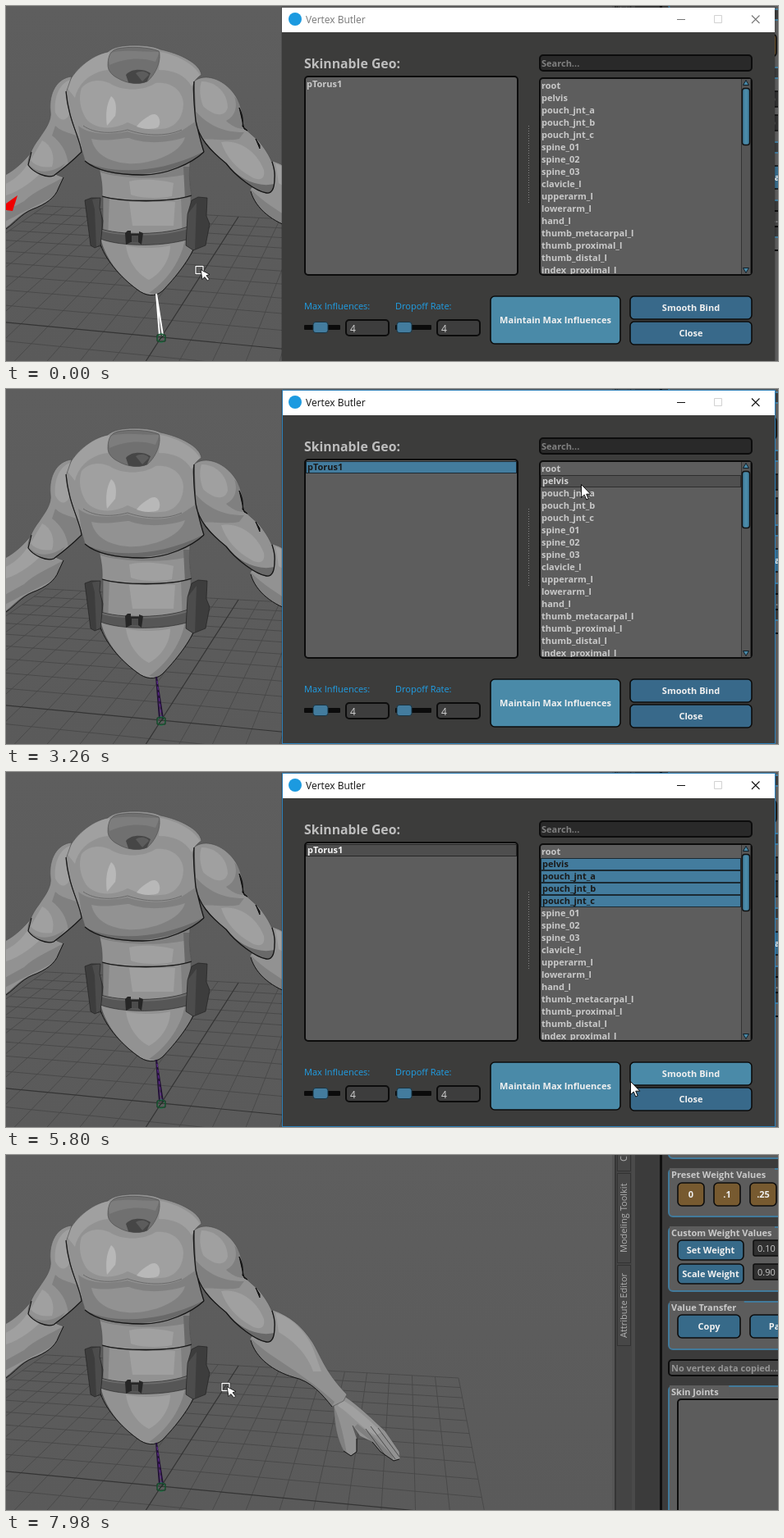
An HTML page for the animation above (8 s loop, 940 by 433 pixels).

```html
<!DOCTYPE html>
<html lang="en">
<head>
<meta charset="utf-8">
<title>Skin binding</title>
<style>
html, body { margin: 0; width: 100%; height: 100%; overflow: hidden; background: #5c5c5c; }
svg { display: block; width: 940px; height: 433px; font-family: "Open Sans", "Noto Sans", sans-serif; }
text { white-space: pre; }
</style>
</head>
<body>
<svg id="stage" viewBox="0 0 940 433">
  <defs>
    <linearGradient id="bg" x2="0" y2="1"><stop stop-color="#5e5e5e"/><stop offset="1" stop-color="#5a5a5a"/></linearGradient>
    <linearGradient id="thumb" x2="1"><stop stop-color="#3d7897"/><stop offset=".5" stop-color="#4d8eac"/><stop offset="1" stop-color="#3d7897"/></linearGradient>
    <clipPath id="listClip"><rect x="651" y="89" width="245" height="238"/></clipPath>
  </defs>
  <rect width="940" height="433" fill="url(#bg)"/>
</svg>
<script>
const LOOP = 8000, FRAME = 120;
const BLUE = '#4a8aa8', DEEP = '#38698a', EDGE = '#0c0c0c', TEXT = '#c9c9c9';
const stage = document.getElementById('stage');

function add(parent, tag, attrs) {
  const el = document.createElementNS('http://www.w3.org/2000/svg', tag);
  for (const k in attrs) el.setAttribute(k, attrs[k]);
  parent.appendChild(el);
  return el;
}
const group = (parent, attrs) => add(parent, 'g', attrs);
const path = (parent, d, fill, stroke = 'none', w = 1) =>
  add(parent, 'path', { d, fill, stroke, 'stroke-width': w, 'stroke-linejoin': 'round' });
const rect = (parent, x, y, width, height, fill, rx = 0, stroke = 'none', w = 2) =>
  add(parent, 'rect', { x, y, width, height, fill, rx, stroke, 'stroke-width': w });
function label(parent, x, y, str, fill = TEXT, size = 11, weight = 700, extra = {}) {
  const el = add(parent, 'text', { x, y, fill, 'font-size': size, 'font-weight': weight, ...extra });
  el.textContent = str;
  return el;
}
function button(parent, x, y, w, h, str, fill = DEEP) {
  const box = rect(parent, x + 1, y + 1, w - 2, h - 2, fill, 5, EDGE, 1.6);
  label(parent, x + w / 2, y + h / 2 + 4, str, '#f0f0f0', 11, 700, { 'text-anchor': 'middle' });
  return box;
}

/* ---------- ground grid ---------- */
function ground(u, v) {
  const w = 1 - .0945 * u + .4622 * v;
  return ((339.8 * u + 224.8 * v + 189) / w).toFixed(1) + ' ' + ((-3.8 * u - 28.2 * v + 404) / w).toFixed(1);
}
const view = group(stage, {});
let thin = '';
for (let i = -10; i <= 10; i++) {
  const k = i / 10;
  if (i) thin += `M${ground(k, -.6)}L${ground(k, 1)}M${ground(-1, k)}L${ground(1, k)}`;
}
path(view, thin, 'none', '#484848', .9);
path(view, `M${ground(0, -.6)}L${ground(0, 1)}M${ground(-1, 0)}L${ground(1, 0)}`, 'none', '#343434', 1.2);

/* ---------- figure ---------- */
let clips = 0;
function part(d, fill, bands = [], line = '#4a4a4a') {
  const id = 'part' + clips++;
  path(add(stage.querySelector('defs'), 'clipPath', { id }), d, '#fff');
  path(view, d, fill);
  const g = group(view, { 'clip-path': `url(#${id})` });
  for (const [b, c] of bands) path(g, b, c);
  path(view, d, 'none', line, .6);
}
const crease = (d, w = 1.3) => path(view, d, 'none', '#161616', w);
const L = '#a0a0a0', H = '#b8b8b8', M = '#929292', D = '#808080', K = '#696969';

// far forearm and hand
part('M399 306L412 294C430 306 448 324 462 337L479 362L480 371L472 373L456 362L446 350L431 343L422 330L427 345L427 362L420 367L411 361C403 346 400 330 399 306Z', M, [
  ['M408 298C428 308 446 328 458 338L450 342C434 334 420 316 404 306Z', L],
  ['M400 308C408 326 412 348 415 364L410 362C404 344 400 330 399 306Z', D],
  ['M424 332L446 350L456 362L472 373L470 366L448 344L428 328Z', D]]);
path(view, 'M444 331L474 371M453 333L479 368M438 334L462 367', 'none', '#444', .9);
crease('M427 346L427 362L420 367L411 361M446 350L456 362L472 373L479 371', 1);
part('M325 189C345 196 360 208 373 228C384 246 388 264 415 292L411 300L397 307C385 292 372 276 350 271C326 264 304 248 297 224Z', M, [
  ['M328 192C352 200 370 222 376 242L384 264L374 264C366 240 346 224 332 216Z', L],
  ['M297 222C318 246 352 258 400 301L396 308C376 278 336 276 300 250Z', D]]);
crease('M298 226C304 248 326 264 350 271C372 276 385 292 397 307', 1);

// near forearm
part('M31 178C20 192 8 202 -3 207L-3 273C10 264 16 254 32 248C48 242 60 234 64 222L70 209L62 206Z', M, [
  ['M32 182C24 200 12 212 -3 218L-3 232C18 226 34 212 44 202Z', L],
  ['M70 209C54 218 34 226 22 238L-3 252V264C18 252 46 240 62 230Z', D]]);
crease('M0 272C12 264 18 254 32 248C48 242 60 234 64 222L70 209', 1);

// waist
part('M111 190L224 190C223 206 223 216 226 231C200 240 140 239 117 232C118 218 115 204 111 190Z', M, [
  ['M111 190H224V204C200 212 140 212 112 202Z', D],
  ['M150 214C164 210 190 212 204 216L202 232C184 236 162 234 152 230Z', L],
  ['M216 196L228 196V236H218Z', K]]);
part('M118 233C146 240 198 240 225 232L226 282L118 284Z', M, [
  ['M150 239H206L204 268H154Z', L], ['M213 232H228V286H215Z', D], ['M117 232H126L124 284H117Z', D]]);
crease('M117 232C140 239 200 240 226 231');
part('M114 278C118 306 138 330 160 346C170 354 182 355 190 348C206 332 226 306 230 290L222 280C196 294 140 292 114 278Z', M, [
  ['M146 292C160 296 188 296 200 292C200 312 186 328 174 334C158 326 148 308 146 292Z', L],
  ['M218 284L232 284C228 310 206 340 186 353L174 350C198 334 214 308 218 284Z', D]]);
crease('M114 288C120 308 138 330 160 346C170 354 182 355 190 348C206 332 226 306 230 292', 1);

// belt and pouches
part('M113 271C136 280 196 280 224 268L226 283C196 294 140 294 115 284Z', '#565656', [
  ['M113 271C136 280 196 280 224 268V271C196 282 140 282 114 274Z', '#6c6c6c']], '#222');
path(view, 'M145 277L148 274H152V278H162V275L167 277L165 291L161 288H152L146 291Z', '#262626');
rect(view, 153, 280, 8, 8, '#4c4c4c');
part('M96 237L104 234H115L114 246L118 262L115 292L108 295L103 292Z', '#3d3d3d', [
  ['M105 236L115 234L117 290L110 294L108 248Z', '#4c4c4c']], '#1e1e1e');
part('M226 237L234 233L245 234L244 256L248 266L243 292L228 298L219 292L221 254Z', '#3d3d3d', [
  ['M221 254L232 240L230 298L219 294Z', '#4c4c4c']], '#1e1e1e');

// ribcage
part('M124 56C130 50 142 48 156 48C172 48 182 50 188 53C212 58 236 70 238 84C230 89 227 94 228 104C230 132 236 160 241 178C226 192 196 206 166 206C134 206 110 201 96 189C92 170 76 140 73 100C82 78 104 60 124 56Z', M, [
  ['M73 98C84 74 106 58 126 56L124 78C104 80 88 94 84 112Z', L],
  ['M188 56C210 60 230 72 236 84L226 98C218 84 204 78 186 78Z', L],
  ['M88 146C100 156 122 158 148 153C166 159 194 162 214 152L232 140L242 180C214 200 176 208 148 206C116 204 98 196 94 186Z', D],
  ['M104 162C122 166 142 161 150 161C166 168 196 168 218 160C212 182 172 194 148 192C124 190 108 180 104 162Z', M],
  ['M92 100C102 88 118 90 126 94C140 104 168 104 182 94C198 92 214 100 216 118C216 138 204 150 188 150C170 152 158 146 148 142C130 152 108 150 98 138C90 126 88 112 92 100Z', L],
  ['M128 110C134 114 135 124 133 134L123 146C121 134 122 120 128 110Z', H],
  ['M176 133C186 128 190 142 185 148C174 152 164 149 159 147C162 142 168 138 176 133Z', H],
  ['M94 188C120 204 180 208 240 178V182C200 208 130 214 96 192Z', K]]);
path(view, 'M94 146C108 156 130 156 148 151C168 158 194 160 214 151', 'none', '#6a6a6a', 1);
part('M124 72C124 60 128 54 136 52C150 49 174 50 186 55C190 66 182 84 172 92C160 97 146 94 136 88C128 84 124 78 124 72Z', '#707070', [
  ['M124 58C140 52 164 56 187 56L182 68C164 62 144 64 126 72Z', '#7d7d7d'],
  ['M146 84C152 76 168 76 176 82L170 96H150Z', '#464646'],
  ['M158 82C164 78 172 80 174 84L166 92Z', '#5c5c5c']]);
crease('M96 189C110 201 134 206 166 206C196 206 226 192 241 178');

// upper arms
part('M80 86C62 88 52 106 54 128C56 140 48 150 40 162C32 172 26 186 27 194C34 204 50 210 58 207C70 198 80 190 92 178C90 160 76 140 73 106Z', M, [
  ['M78 90C66 94 58 110 60 130C66 142 74 140 77 132L73 106Z', L],
  ['M60 146C70 156 82 154 92 162V182L76 194C74 176 66 166 56 158Z', D],
  ['M44 164C56 170 60 184 56 196C44 198 34 194 30 188Z', L],
  ['M27 192C38 206 56 204 72 192L60 210H30Z', D]]);
crease('M73 104C76 140 90 160 92 178C80 190 70 198 58 207C50 210 34 204 27 194L31 178', 1.1);
part('M229 92C242 81 264 89 277 106C287 119 289 134 288 147L308 165C320 180 328 194 327 210C327 222 324 229 317 228C304 226 280 208 268 192C248 176 234 160 231 140Z', M, [
  ['M238 92C256 92 270 106 270 124C266 138 250 132 240 122C236 112 235 100 238 92Z', L],
  ['M278 110L290 124V150C282 150 274 146 268 140C280 134 282 122 278 110Z', D],
  ['M229 126C244 144 262 154 290 154L284 162C266 166 246 160 236 164Z', D],
  ['M262 166C284 162 306 178 314 200C316 212 308 214 298 208C280 198 268 184 262 166Z', L],
  ['M264 190C284 210 304 222 327 217L322 232C300 230 276 208 262 192Z', K]]);
crease('M229 92C228 104 229 122 231 140C234 152 237 166 241 178M231 140C234 160 248 176 268 192C280 208 304 226 317 228C324 229 327 222 327 210C328 202 326 196 324 190');
path(view, 'M284 124C288 132 289 140 288 147L294 152L290 150ZM304 162L309 170V174Z', '#111', '#111');

// root joint
const bone = group(view, {});
const boneLine = path(bone, 'M183 351L187 402M183 351L191 402', 'none', '#fff', 2);
const boneDots = add(bone, 'path', { d: 'M184 356L189 401', stroke: '#6a2fa0', 'stroke-width': 1, 'stroke-dasharray': '4 3' });
add(bone, 'circle', { cx: 189, cy: 405, r: 5, fill: 'none', stroke: '#1f7a4a', 'stroke-width': 1.3 });
path(bone, 'M184 401H194V409H184ZM186 408L192 402', 'none', '#12351f', 1);
const redTip = path(view, 'M0 241L14 231L8 250L0 249Z', '#f00000');

/* ---------- side panel ---------- */
const side = group(stage, {});
rect(side, 738, 0, 202, 433, '#444');
rect(side, 738, 0, 3, 433, '#555');
rect(side, 741, 0, 2, 433, '#353535');
for (const [y, h] of [[-60, 80], [22, 110], [134, 99]]) rect(side, 744.5, y + .5, 16, h - 1, '#474747', 0, '#333', 1);
rect(side, 762, 0, 4, 433, '#4a4a4a');
rect(side, 766, 0, 174, 433, '#3b3b3b');
rect(side, 796, 0, 3, 433, '#101010');
const tab = (y, s) => label(side, 0, 0, s, '#b0b0b0', 11, 400, { transform: `translate(756 ${y}) rotate(-90)` });
tab(8, 'Channel Box'); tab(119, 'Modeling Toolkit'); tab(223, 'Attribute Editor');

function section(y, h, str) {
  rect(side, 807, y, 160, h, '#5c5c5c', 5, '#427a9b', 2);
  if (!str) return;
  rect(side, 808, y - 1, str.length * 6.2 + 4, 12, '#5c5c5c');
  label(side, 810, y + 11, str);
}
section(-30, 34);
section(17, 58, 'Preset Weight Values');
['0', '.1', '.25'].forEach((s, i) => button(side, 817 + 44 * i, 33, 34, 30, s, '#775a30'));
section(88, 78, 'Custom Weight Values');
[['Set Weight', '0.10'], ['Scale Weight', '0.90']].forEach(([s, n], i) => {
  const y = 103 + 29 * i;
  button(side, 817, y, 82, 26, s, '#376a89');
  rect(side, 910, y + 1, 40, 19, '#303030', 2, EDGE, 1.5);
  label(side, 915, y + 15, n, TEXT, 11, 400);
});
section(179, 58, 'Value Transfer');
button(side, 817, 194, 78, 30, 'Copy', '#376a89');
button(side, 905, 194, 78, 30, 'Paste', '#376a89');
rect(side, 807, 250, 160, 19, '#474747', 4, EDGE);
label(side, 810, 264, 'No vertex data copied...', '#959595');
section(282, 200, 'Skin Joints');
rect(side, 818, 298, 160, 180, '#5c5c5c', 4, EDGE);

/* ---------- dialog ---------- */
const win = group(stage, {});
rect(win, 335, 1, 602, 440, 'rgba(0,0,0,.15)');
rect(win, 336, 2, 600, 431, '#3c3c3b');
rect(win, 336, 2, 600, 30, '#fff');
add(win, 'circle', { cx: 352, cy: 16, r: 8, fill: '#1c9ae0' });
const title = label(win, 365, 21, 'Vertex Butler', '#777', 12, 400);
const controls = group(win, {});
const minClose = path(controls, 'M817 16.5H827M908 11.5L917.5 21M917.5 11.5L908 21', 'none', '#777', 1.1);
path(controls, 'M862.5 11.5H871.5V20.5H862.5Z', 'none', '#d2d2d2');
const frame = rect(win, 336.5, 1.5, 600, 431, 'none', 0, '#2c7fb8', 1);

label(win, 363, 76, 'Skinnable Geo:', '#bdbdbd', 15.8);
rect(win, 364, 86, 259, 242, '#5d5d5d', 4, EDGE);
rect(win, 650, 60, 258, 19, '#292929', 4, EDGE);
label(win, 652, 74, 'Search...', '#808080');
rect(win, 650, 88, 258, 240, '#5d5d5d', 4, EDGE);
add(win, 'path', { d: 'M636.5 146V241', stroke: '#858585', 'stroke-dasharray': '1 2' });

function row(parent, x, y, w, str) {
  const box = rect(parent, x + .5, y + .5, w - 1, 14, 'none', 0, 'none', 1);
  const text = label(parent, x + 1, y + 11, str);
  const looks = {
    plain: ['none', 'none', TEXT, 1], hover: ['#505050', '#2e2e2e', '#d2d2d2', 2],
    on: ['#437c9e', '#1b2a33', '#1a1a1a', 2], kept: ['#4e4e4e', '#262626', '#f4f4f4', 2]
  };
  return name => {
    const [fill, stroke, ink, dx] = looks[name];
    box.setAttribute('fill', fill);
    box.setAttribute('stroke', stroke);
    text.setAttribute('fill', ink);
    text.setAttribute('x', x + dx);
  };
}
const geoBox = group(win, {});
const geo = row(geoBox, 365, 88, 257, 'pTorus1');
const listBox = group(win, { 'clip-path': 'url(#listClip)' });
const joints = ('root pelvis pouch_jnt_a pouch_jnt_b pouch_jnt_c spine_01 spine_02 spine_03 clavicle_l upperarm_l ' +
  'lowerarm_l hand_l thumb_metacarpal_l thumb_proximal_l thumb_distal_l index_proximal_l')
  .split(' ').map((s, i) => row(listBox, 651, 90 + 15 * i, 244, s));

rect(win, 895, 89, 12, 238, '#555');
path(win, 'M895.5 89V327M906.5 89V327', 'none', '#343434');
path(win, 'M897.5 96.5L901 90.5L904.5 96.5ZM897.5 319.5L901 325.5L904.5 319.5Z', BLUE, '#10202a');
rect(win, 896.5, 100.5, 9, 69, 'url(#thumb)', 3, '#111', 1.4);

[[363, 'Max Influences:', 374], [474, 'Dropoff Rate:', 476]].forEach(([x, s, knob]) => {
  label(win, x, 370, s, '#1f9fe6', 11, 400);
  rect(win, x, 389, 44, 6, '#0b0b0b', 1);
  rect(win, knob, 385.5, 18, 13, '#437c9e', 3, '#1a3442', 1);
  rect(win, x + 51, 383, 52, 19, '#3d3d3d', 4, EDGE);
  label(win, x + 56, 398, '4', '#d0d0d0', 12, 400);
});
button(win, 589, 353, 160, 60, 'Maintain Max Influences', BLUE);
const bind = button(win, 759, 353, 150, 30, 'Smooth Bind');
const close = button(win, 759, 384, 150, 30, 'Close');

/* ---------- pointers ---------- */
const arrow = path(stage, 'M.5 .5V16.5L4.2 13L6.8 19L9.2 18L6.7 12.2H11.8Z', '#fff', '#000', .9);
const picker = group(stage, {});
path(picker, 'M1 1.5H10V10.5H1Z', 'none', '#222', 2.6);
path(picker, 'M1 1.5H10V10.5H1Z', 'none', '#fff', 1.3);
path(picker, 'M7 5.5L9 17.5L11.8 14.6L15.4 19L17.6 17.2L14 12.8L18 11.5Z', '#fff', '#111', .9);

/* ---------- timing ---------- */
// runs of evenly spaced updates: [first, last]
const runs = [[0, 120], [360, 2040], [2290, 2410], [2650, 3010], [3260, 3980],
  [4470, 5310], [5680, 6040], [6290, 6530], [6900, 7980]];
// pointer path: t, x, y
const way = [
  [0, 230, 316], [120, 229, 316], [360, 240, 326], [600, 279, 362], [840, 205, 392], [1080, 95, 398],
  [1320, 140, 360], [1560, 250, 250], [1800, 368, 136], [1920, 392, 113], [2040, 390, 102],
  [2290, 390, 98], [2410, 390, 94], [2650, 430, 97], [2770, 545, 96], [2890, 655, 116], [3010, 712, 133],
  [3260, 700, 116], [3380, 700, 117], [3740, 699, 154], [3980, 698, 158],
  [4470, 695, 192], [4710, 688, 296], [4830, 685, 349], [4950, 706, 384], [5070, 764, 407], [5190, 730, 388],
  [5310, 708, 387], [5680, 730, 382], [5920, 790, 371], [6040, 804, 367], [6290, 810, 366], [6530, 811, 367],
  [6900, 808, 370], [7020, 805, 388], [7140, 798, 391], [7380, 794, 387], [7500, 620, 352], [7620, 413, 315],
  [7740, 352, 299], [7860, 294, 284], [7980, 262, 277]];

function stepTime(t) {
  let s = 0;
  for (const [a, b] of runs) if (t >= a) s = Math.min(b, a + Math.floor((t - a) / FRAME) * FRAME);
  return s;
}
function pointerAt(t) {
  let i = way.length - 1;
  while (way[i][0] > t) i--;
  const [t0, x0, y0] = way[i], [t1, x1, y1] = way[i + 1] || [t0 + 1, x0, y0];
  const k = (t - t0) / (t1 - t0);
  return [x0 + (x1 - x0) * k, y0 + (y1 - y0) * k];
}
const inside = (x, y, l, t, r, b) => x >= l && x < r && y >= t && y < b;
const show = (el, on) => el.setAttribute('visibility', on ? 'visible' : 'hidden');

function draw(time) {
  const t = stepTime(time), [x, y] = pointerAt(t);
  const picked = t < 1080, active = t >= 2290, open = t < 7500;

  show(redTip, picked);
  show(boneDots, !picked);
  boneLine.setAttribute('stroke', picked ? '#fff' : '#25123a');

  title.setAttribute('fill', active ? '#111' : '#777');
  minClose.setAttribute('stroke', active ? '#111' : '#777');
  show(frame, active);
  show(controls, t < 7260);

  show(geoBox, t < 6410);
  geo(t >= 3380 ? 'kept' : t >= 2410 ? 'on' : inside(x, y, 365, 88, 622, 102) ? 'hover' : 'plain');
  const last = t < 3380 ? 0 : Math.min(4, 1 + Math.floor((t - 3380) / FRAME));
  const over = inside(x, y, 651, 90, 895, 327) ? Math.floor((y - 90) / 15) : -1;
  joints.forEach((set, i) => set(i > 0 && i <= last ? 'on' : i === over ? 'hover' : 'plain'));
  bind.setAttribute('fill', inside(x, y, 759, 353, 909, 383) ? BLUE : DEEP);
  close.setAttribute('fill', inside(x, y, 759, 384, 909, 414) ? BLUE : DEEP);

  const [alpha, size] = t >= 7380 ? [.43, .972] : t >= 7260 ? [.84, .991] : [1, 1];
  win.setAttribute('display', open ? 'inline' : 'none');
  win.setAttribute('opacity', alpha);
  win.setAttribute('transform', size === 1 ? '' : `translate(600 210) scale(${size}) translate(-600 -210)`);

  const onView = x < (open ? 334 : 738);
  const at = `translate(${Math.round(x)} ${Math.round(y)})`;
  show(arrow, !onView);
  show(picker, onView);
  arrow.setAttribute('transform', at);
  picker.setAttribute('transform', at);
}
const start = performance.now();
function tick() {
  draw((performance.now() - start) % LOOP);
  requestAnimationFrame(tick);
}
tick();
</script>
</body>
</html>
```
